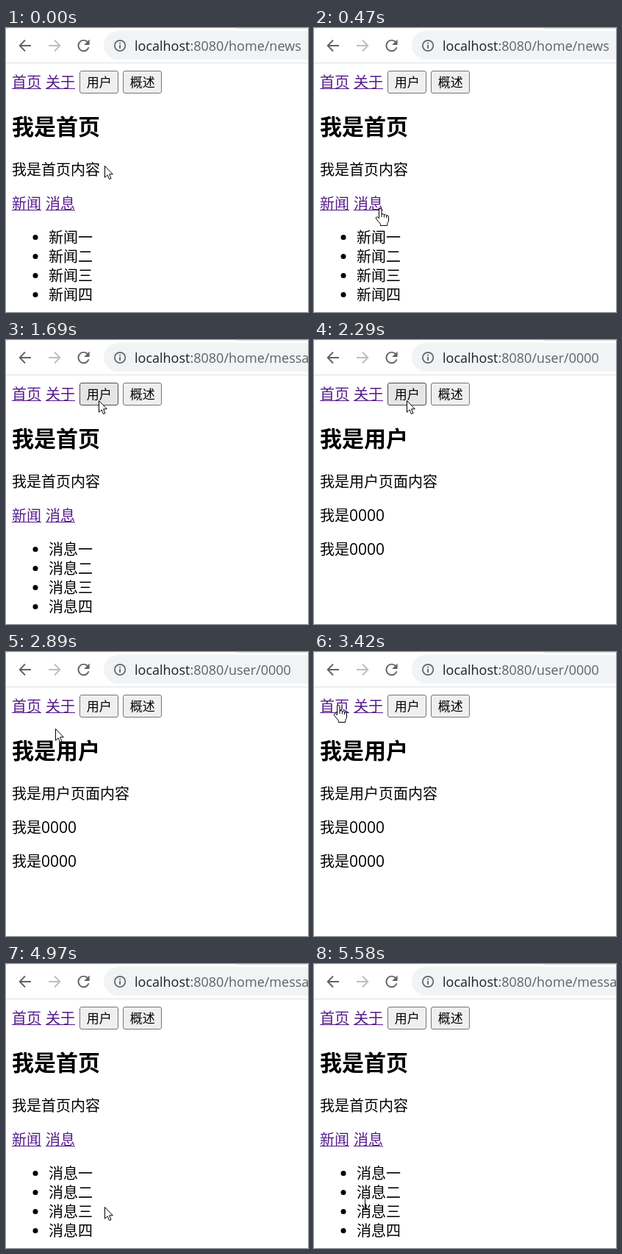
Write an HTML page with a canvas that moves like this. It is 411 px wide and 386 px high and loops after 5770 ms.

```html
<!DOCTYPE html>
<html lang="zh-CN">
<head>
<meta charset="utf-8">
<title>路由切换</title>
<style>
html, body { margin: 0; width: 100%; height: 100%; overflow: hidden; background: #fff; }
canvas { display: block; }
</style>
</head>
<body>
<canvas id="stage" width="411" height="386"></canvas>
<script>
const ctx = document.getElementById('stage').getContext('2d');
const LOOP = 5770, STEP = 68;
const CJK = '"Noto Sans CJK SC", "Noto Sans CJK", sans-serif';
const LATIN = '"Open Sans", "Noto Sans", sans-serif';
const VISITED = '#551a8b', ACTIVE = '#ff0000', INK = '#000', GREY = '#5f6368';

// The pointer glides from rest to rest; bow bends the way sideways.
const glides = [
  { start: 0, end: 470, to: [90, 246], bow: [0, 0] },
  { start: 1080, end: 1690, to: [126, 82], bow: [-8, 0] },
  { start: 2420, end: 3420, to: [33, 73], bow: [0, 30] },
  { start: 3680, end: 4310, to: [65, 303], bow: [0, 0] },
  { start: 4310, end: 4840, to: [80, 290], bow: [-20, 60] },
  { start: 4840, end: 5580, to: [69, 325], bow: [75, 40] }
];

const easeOut = u => 1 - (1 - u) ** 1.6;

function pointerAt(t) {
  let pos = [134, 187];
  for (const { start, end, to, bow } of glides) {
    if (t < start) break;
    const steps = Math.round((end - start) / STEP);
    const u = Math.min(1, (t - start) / (end - start));
    const e = easeOut(Math.floor(u * steps + 0.1) / steps);
    pos = pos.map((p, i) => Math.round(p + (to[i] - p) * e + bow[i] * Math.sin(Math.PI * e)));
  }
  return pos;
}

const inside = (x, y, l, t, r, b) => x >= l && x < r && y >= t && y < b;

function cursorKind(x, y, page) {
  const overLinks = top => inside(x, y, 8, top, 48, top + 30) || inside(x, y, 54, top, 94, top + 30);
  if (overLinks(58)) return 'hand';
  if (page !== 'user') {
    if (overLinks(218)) return 'hand';
    if (inside(x, y, 50, 271, 119, 376)) return 'beam';
  }
  const overText = inside(x, y, 8, 181, 129, 205) || inside(x, y, 8, 116, 129, 155);
  return overText ? 'beam' : 'arrow';
}

function text(str, x, y, size = 20, color = INK, family = CJK, weight = 350) {
  ctx.font = `${weight} ${size}px ${family}`;
  ctx.fillStyle = color;
  ctx.fillText(str, x, y);
  return x + ctx.measureText(str).width;
}

function link(str, x, y, color = VISITED) {
  text(str, x, y, 20, color);
  ctx.fillRect(x, y + 1, 40, 1);
}

function stroke(path, color, width) {
  ctx.strokeStyle = color;
  ctx.lineWidth = width;
  ctx.stroke(new Path2D(path));
}

function circle(x, y, r) {
  ctx.beginPath();
  ctx.arc(x, y, r, 0, Math.PI * 2);
}

function button(str, x, state) {
  const [fill, edge] = {
    idle: ['#efefef', '#767676'],
    hover: ['#e5e5e5', '#4f4f4f'],
    down: ['#f5f5f5', '#8d8d8d']
  }[state];
  ctx.beginPath();
  ctx.roundRect(x + 0.5, 58.5, 52, 30, 2.5);
  ctx.fillStyle = fill;
  ctx.fill();
  ctx.strokeStyle = edge;
  ctx.lineWidth = 1;
  ctx.stroke();
  text(str, x + 9.7, 80, 17);
}

function navArrow(x, dir, color) {
  ctx.save();
  ctx.translate(x, 24);
  ctx.scale(dir, 1);
  stroke('M8 0H-7M0 -7.5L-7.3 0L0 7.5', color, 1.9);
  ctx.restore();
}

function toolbar(path) {
  ctx.fillStyle = '#dee1e6';
  ctx.fillRect(0, 0, 4, 1);
  ctx.fillRect(313, 0, 98, 1);
  ctx.fillRect(0, 47, 411, 1);
  ctx.fillStyle = '#f1f3f4';
  ctx.beginPath();
  ctx.roundRect(133, 4, 320, 39, 19.5);
  ctx.fill();

  navArrow(26, 1, GREY);
  navArrow(66, -1, '#bbbec2');
  stroke('M111.3 19.3A7.3 7.3 0 1 0 112.6 26.3', GREY, 1.9);
  ctx.fillStyle = GREY;
  ctx.fill(new Path2D('M113.6 15.5V23H106.1Z'));
  circle(155.1, 24, 7.2);
  ctx.lineWidth = 1.7;
  ctx.stroke();
  ctx.fillRect(154.2, 23, 1.8, 5);
  ctx.fillRect(154.2, 19.8, 1.8, 1.8);

  const x = text('localhost', 175, 31, 18, '#202124', LATIN, 400);
  text(':8080' + path, x, 31, 18, GREY, LATIN, 400);
}

function homePage(item, pressed) {
  text('我是首页', 8, 145, 30, INK, CJK, 700);
  text('我是首页内容', 8, 200);
  link('新闻', 8, 246);
  link('消息', 54, 246, pressed ? ACTIVE : VISITED);
  [...'一二三四'].forEach((n, i) => {
    const y = 292 + 26 * i;
    text(item + n, 58, y);
    circle(40, y - 7.5, 3.5);
    ctx.fill();
  });
}

function userPage() {
  text('我是用户', 8, 145, 30, INK, CJK, 700);
  text('我是用户页面内容', 8, 200);
  for (const y of [246, 292]) {
    const x = text('我是', 8, y);
    text('0000', x, y, 21, INK, LATIN, 400);
  }
}

const shapes = {
  arrow: 'M.5 .5V16.2L4.1 12.8L6.5 18.5L9 17.4L6.6 11.8H11.3Z',
  hand: 'M-1.5 11.5V1Q-1.5 -.5 .2 -.5T2 1V7Q4.5 5.8 5.4 7.8Q7.8 6.8 8.6 8.8Q11.5 8 11.5 11V15' +
    'Q11.5 17.5 9.8 19.5V22.5H.3V20.2L-5.5 13.2Q-6.3 11.4 -4.6 10.7Q-3.3 10.4 -1.5 12.8Z',
  beam: 'M-3 -7.5H-1L.5 -6.5L2 -7.5H4M.5 -6.5V6.5M-3 7.5H-1L.5 6.5L2 7.5H4'
};

function cursor(kind, x, y) {
  ctx.save();
  ctx.translate(x, y);
  if (kind !== 'beam') {
    ctx.fillStyle = '#fff';
    ctx.fill(new Path2D(shapes[kind]));
  }
  stroke(shapes[kind], INK, 1);
  if (kind === 'hand') stroke('M2 7V11M5.4 7.8V11.5M8.6 8.8V12', INK, 1);
  ctx.restore();
}

function draw(t) {
  const between = (a, b) => t >= a && t < b;
  const page = t < 950 ? 'news' : between(2220, 3680) ? 'user' : 'message';
  const [x, y] = pointerAt(t);
  const over = inside(x, y, 100, 58, 153, 89);

  ctx.fillStyle = '#fff';
  ctx.fillRect(0, 0, 411, 386);
  toolbar(page === 'user' ? '/user/0000' : '/home/' + page);
  link('首页', 8, 81, between(3550, 3680) ? ACTIVE : VISITED);
  link('关于', 54, 81);
  button('用户', 100, between(2150, 2220) ? 'down' : over ? 'hover' : 'idle');
  button('概述', 159, 'idle');
  if (page === 'user') userPage();
  else homePage(page === 'news' ? '新闻' : '消息', between(810, 950));
  cursor(cursorKind(x, y, page), x, y);
}

function tick() {
  draw(performance.now() % LOOP);
  requestAnimationFrame(tick);
}
tick();
</script>
</body>
</html>
```
